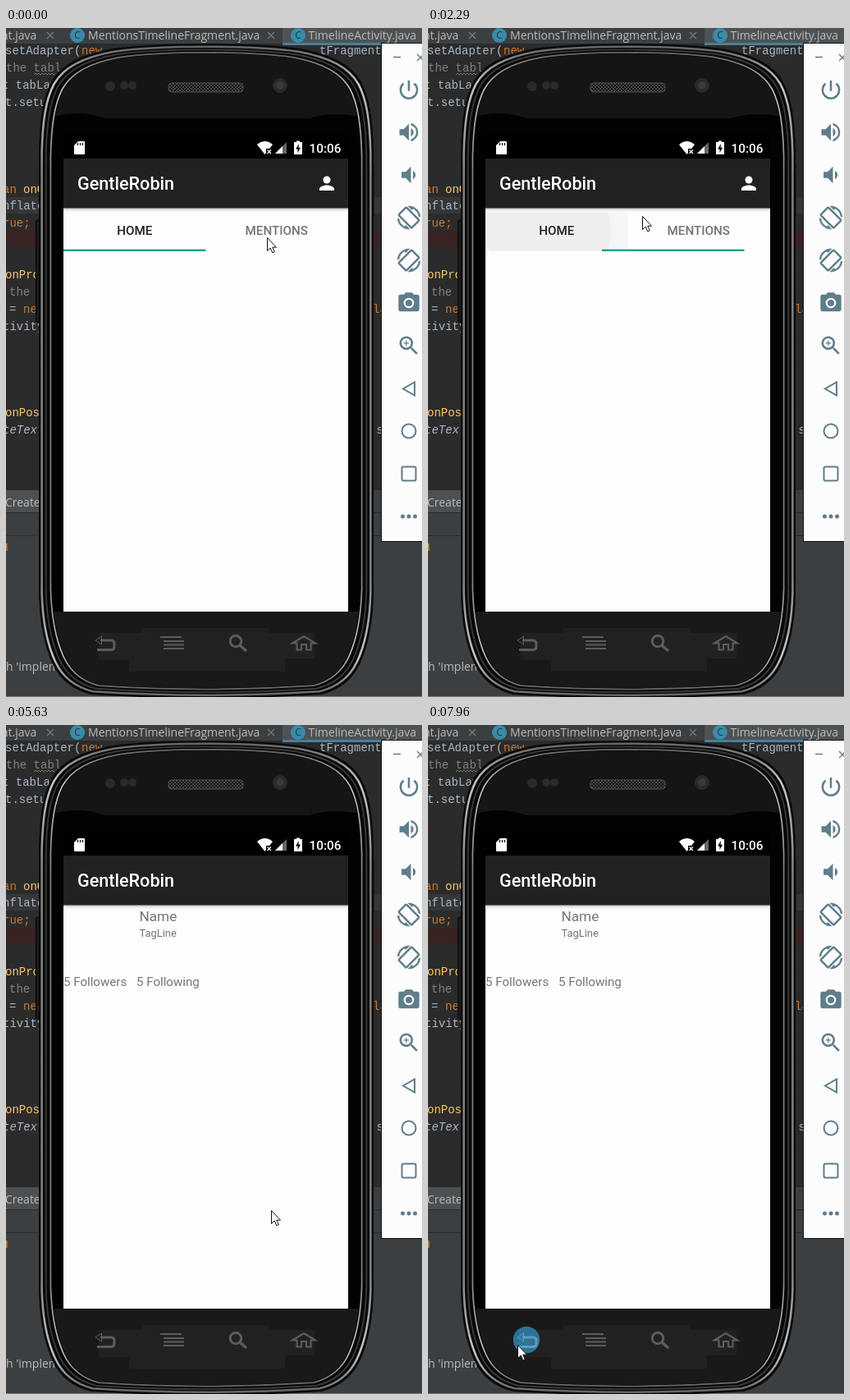
An HTML page that plays this animation: 507x815 px, repeating every 8000 ms.

```html
<!DOCTYPE html>
<html lang="en">
<head>
<meta charset="utf-8">
<title>App demo</title>
<style>
html, body { margin: 0; width: 100%; height: 100%; overflow: hidden; background: #2b2b2b; }
svg { display: block; width: 507px; height: 815px; }
text { white-space: pre; }
.ui { font: 14px "Open Sans", sans-serif; fill: #bbb; }
.code { font: 14px "Liberation Mono", monospace; fill: #a9b7c6; }
.kw { fill: #cc7832; }
.fn { fill: #ffc66d; }
.note { fill: #808080; }
.app { font-family: Roboto, sans-serif; fill: #757575; }
.bold { font-weight: 500; }
.line { fill: none; stroke: #607d8b; stroke-width: 2; }
.key { fill: none; stroke: #5c5c5c; stroke-width: 3; }
</style>
</head>
<body>
<svg viewBox="0 0 507 815">
<defs>
  <path id="shell" d="M41 150C42 110 46 85 56 66C68 45 92 33 130 26C190 18 298 18 358 26C396 33 420 45 432 66C442 85 446 110 447 150V690C446 725 441 752 430 775C420 796 404 806 384 811Q244 820 104 811C84 806 68 796 58 775C47 752 42 725 41 690Z"/>
  <clipPath id="face"><use href="#shell" transform="translate(244 418) scale(.925 .972) translate(-244 -418)"/></clipPath>
  <clipPath id="screen"><rect x="70" y="159" width="347" height="552"/></clipPath>
  <clipPath id="tab"><rect id="tabBox" y="219.500" width="173.500" height="52"/></clipPath>
  <linearGradient id="shade" x2="0" y2="1">
    <stop stop-color="#aaa"/><stop offset=".35" stop-color="#e6e6e6"/><stop offset="1" stop-color="#fcfcfc"/>
  </linearGradient>
  <linearGradient id="rim" x2="0" y2="1">
    <stop stop-color="#666"/><stop offset=".06" stop-color="#c4c4c4"/><stop offset=".2" stop-color="#808080"/>
    <stop offset=".82" stop-color="#808080"/><stop offset=".94" stop-color="#c4c4c4"/><stop offset="1" stop-color="#666"/>
  </linearGradient>
  <pattern id="mesh" width="4" height="4" patternUnits="userSpaceOnUse">
    <rect width="4" height="4" fill="#111"/><path d="M0 0L4 4M4 0L0 4" stroke="#555" stroke-width=".8"/>
  </pattern>
  <g id="badge">
    <circle r="9" fill="#3a8ba8"/>
    <text y="4.200" text-anchor="middle" font-family="Open Sans, sans-serif" font-size="12" fill="#213a44">C</text>
  </g>
  <path id="cross" d="M-4 -4L4 4M4 -4L-4 4" stroke="#777" stroke-width="1.400"/>
  <g id="turn" stroke="#607d8b" stroke-width=".6">
    <rect x="-5.700" y="-9.700" width="11.400" height="19.400" rx="1" transform="rotate(-45)" fill="none" stroke-width="2.100"/>
    <path id="arc" d="M4.480 -9.480C7.750 -7.930 10.090 -4.760 10.450 -1H11.950C11.440 -7.160 6.290 -12 0 -12L-.66 -11.970L3.150 -8.160Z"/>
    <use href="#arc" transform="rotate(180)"/>
  </g>
</defs>

<!-- editor -->
<rect width="507" height="815" fill="#2b2b2b"/>
<rect width="507" height="19" fill="#3c3f41"/>
<rect x="337" width="170" height="19" fill="#4e5254"/>
<rect x="337" y="18" width="170" height="3" fill="#4a7f98"/>
<rect y="206" width="507" height="20" fill="#353637"/>
<rect y="247" width="507" height="20" fill="#3a2323"/>
<rect y="562" width="507" height="253" fill="#3c3f41"/>
<rect y="563" width="42" height="27" fill="#4c5052"/>
<path d="M0 562.500H507M0 590.500H507M0 618.500H507" stroke="#282a2b"/>
<path d="M0 814.500H507" stroke="#777"/>
<g class="ui">
  <text x="-6" y="14">nt.java</text>
  <text x="100" y="14">MentionsTimelineFragment.java</text>
  <text x="368.500" y="14">TimelineActivity.java</text>
  <text x="-1" y="583">Create</text>
  <text x="-5" y="783">th 'impleme</text>
</g>
<use href="#cross" x="54" y="9"/><use href="#cross" x="323" y="9"/>
<use href="#badge" x="87" y="9"/><use href="#badge" x="356" y="9"/>
<g class="code" id="code"></g>
<path d="M34 57l2 -2l2 2l2 -2l2 2l2 -2l2 2l2 -2l2 2l2 -2l2 2l2 -2l2 2l2 -2" fill="none" stroke="#5b8a5b"/>
<rect y="628" width="1.500" height="9" fill="#b8863c"/>

<!-- emulator controls -->
<rect x="457.500" y="18.500" width="60" height="607" fill="#fcfcfd" stroke="#111"/>
<g fill="#607d8b" id="tools">
  <path d="M472 35.500H481M501 32L509 40M509 32L501 40" class="line" style="stroke-width:1.400"/>
  <use href="#turn" transform="translate(491 231) scale(1.160)"/>
  <use href="#turn" transform="translate(491 283) scale(-1.160 1.160)"/>
  <path d="M498 431.500V447.500L484 439.500Z" class="line"/>
  <circle cx="491" cy="491" r="8.500" class="line"/>
  <rect x="482.500" y="534.500" width="17" height="17" rx="2" class="line"/>
  <circle cx="483.500" cy="595" r="2.500"/><circle cx="491" cy="595" r="2.500"/><circle cx="498.500" cy="595" r="2.500"/>
</g>

<!-- handset -->
<rect x="36.500" y="234" width="8" height="124" rx="2" fill="#1a1a1a" stroke="#050505"/>
<rect x="441" y="165" width="7" height="65" rx="2" fill="#222" stroke="#0a0a0a"/>
<use href="#shell" fill="#080808" stroke="#0a0a0a" stroke-width="2"/>
<use href="#shell" fill="none" stroke="url(#rim)" stroke-width="2.600" transform="translate(244 418) scale(.987 .993) translate(-244 -418)"/>
<use href="#shell" fill="none" stroke="#383838" stroke-width="2" transform="translate(244 418) scale(.962 .984) translate(-244 -418)"/>
<use href="#shell" fill="#020202" stroke="url(#rim)" stroke-width="1.800" transform="translate(244 418) scale(.934 .975) translate(-244 -418)"/>
<g clip-path="url(#face)">
  <path d="M50 110V20H440V110Q400 100 370 110H120Q90 98 50 110Z" fill="#151515"/>
  <path d="M40 711H447V815H40Z" fill="#191919"/>
  <path d="M113 737H165V731H320V737H376V768H340V784H150V770H113Z" fill="#212121"/>
</g>
<rect x="198" y="67" width="91" height="11" rx="4" fill="url(#mesh)" stroke="#555"/>
<g fill="#2a2a2a">
  <circle cx="127" cy="71" r="6"/><circle cx="144" cy="70" r="5"/><circle cx="154" cy="70" r="5"/>
  <circle cx="334" cy="70" r="9"/><circle cx="334" cy="70" r="5" fill="#343a42"/>
</g>
<rect x="70" y="130" width="347" height="581" fill="#000"/>
<g fill="#fff">
  <path d="M88 138H95Q96 138 96 139V153Q96 154 95 154H84Q83 154 83 153V143Z"/>
  <path d="M87.500 140V143M90.500 140V143M93.500 140V143" stroke="#000" stroke-width="1.200"/>
  <path d="M306 142Q315.500 134 325 142L321 147H317V152L315.500 154Z"/>
  <path d="M318.500 148.500L323 153M323 148.500L318.500 153" stroke="#fff" stroke-width="1.300"/>
  <path d="M328 153L342 139V153Z" fill="#666"/>
  <path d="M328 153L337 144V153Z"/>
  <path d="M351 139H354V137.500H358V139H361V154H351Z"/>
  <path d="M357 141L353 147.500H355.500V152L359 145.800H356.500Z" fill="#000"/>
  <text x="369.500" y="152" class="app bold" style="fill:#fff" font-size="15.300">10:06</text>
</g>

<g clip-path="url(#screen)">
  <g id="app">
    <rect x="70" y="159" width="347" height="552" fill="#fdfdfd"/>
    <g id="tabs" class="app bold" font-size="15.200">
      <g clip-path="url(#tab)">
        <rect id="wash" x="70" y="219" width="347" height="53"/>
        <circle id="ripple" cy="246"/>
      </g>
      <text id="home" x="156.800" y="251.500" text-anchor="middle">HOME</text>
      <text id="mentions" x="329.800" y="251.500" text-anchor="middle">MENTIONS</text>
      <rect id="bar" y="269.700" width="173.500" height="2.100" fill="#009688"/>
    </g>
    <g id="profile" class="app">
      <text x="162.500" y="238.500" font-size="17.200">Name</text>
      <text x="162.500" y="258" font-size="12.900">TagLine</text>
      <text x="70" y="318" font-size="15.100">5 Followers</text>
      <text x="159" y="318" font-size="15.100">5 Following</text>
    </g>
    <rect x="70" y="219.500" width="347" height="5" fill="url(#shade)"/>
    <rect x="70" y="159" width="347" height="60.500" fill="#212121"/>
    <text x="87" y="197" class="app bold" style="fill:#fff" font-size="21.600">GentleRobin</text>
    <g id="person">
      <circle id="press" cx="392" cy="191.500" r="11" fill="#333"/>
      <circle cx="391" cy="185" r="4.500" fill="#fff"/>
      <path d="M382 198V196C382 193 388 191.500 391 191.500S400 193 400 196V198Z" fill="#fff"/>
    </g>
  </g>
</g>

<!-- hardware keys -->
<circle id="hover" cx="120" cy="749" r="16.200"/>
<g id="backKey" class="key">
  <path d="M115 746H128Q132 746 132 750V753Q132 757.500 128 757.500H111"/>
  <path d="M116.500 741V751L109 746Z" stroke-width="1"/>
</g>
<g class="key">
  <path d="M188 742H214M192 747H217M192 751.500H217M192 756H217" stroke-width="2.200"/>
  <circle cx="280" cy="747" r="6.800"/><path d="M285 752L293 759" stroke-width="3.500"/>
  <path d="M349 749.500L363 741L377 749.500H371.500V757.500H366V751H360V757.500H354.500V749.500Z" stroke-width="2.200"/>
</g>

<path id="cursor" d="M.5 .5V16.500L4.200 13L6.800 18.800L9.300 17.700L6.700 12.200H11.500Z" fill="#fff" stroke="#111"/>
</svg>
<script>
const NS = "http://www.w3.org/2000/svg";
const LOOP = 8000;
const $ = id => document.getElementById(id);

function add(parent, tag, attrs, text = "") {
  const el = document.createElementNS(NS, tag);
  for (const k in attrs) el.setAttribute(k, attrs[k]);
  el.textContent = text;
  parent.append(el);
}
function set(id, attrs) {
  for (const k in attrs) $(id).setAttribute(k, attrs[k]);
}
const show = (id, on) => set(id, { visibility: on ? "visible" : "hidden" });

const code = [
  [-1, 32, "setAdapter("], [92, 32, "new", "kw"], [382, 32, "tFragmentM"],
  [0, 53, "the tabl", "note"], [-5, 74, "t tabLay"], [-1, 95, "t.setup"],
  [-4, 201, "an", "kw"], [21, 201, "onCr", "fn"], [-4, 221, "nflater"],
  [-4, 242, "rue;", "kw"], [-1, 305, "onProf", "fn"], [4, 326, "the ", "note"],
  [4, 347, "="], [21, 347, "new", "kw"], [447, 347, "la", "kw"],
  [-4, 368, "tivity"], [-1, 473, "onPost", "fn"], [-4, 494, "teText"], [443, 494, ".s"]
];
for (const [x, y, text, cls = ""] of code) {
  const attrs = { x, y, class: cls };
  if (text === "teText") attrs["font-style"] = "italic";
  add($("code"), "text", attrs, text);
}

const speaker = "M3 9v6h4l5 5V4L7 9H3zm13.500 3c0-1.770-1.020-3.290-2.500-4.030v8.050c1.480-.73 2.500-2.250 2.500-4.020z";
const icons = [
  [491, 75.5, "M13 3h-2v10h2V3zm4.830 2.170l-1.420 1.420A7 7 0 1 1 7.580 6.580L6.170 5.170A9 9 0 1 0 17.830 5.170z"],
  [491, 127, speaker + "M14 3.230v2.060a7 7 0 0 1 0 13.420v2.060A9 9 0 0 0 14 3.230z"],
  [493.5, 179, speaker],
  [491, 335, "M12 8.800a3.200 3.200 0 1 0 0 6.400a3.200 3.200 0 1 0 0-6.400zM9 2L7.170 4H4a2 2 0 0 0-2 2v12a2 2 0 0 0 2 2h16a2 2 0 0 0 2-2V6a2 2 0 0 0-2-2h-3.170L15 2H9zm3 5a5 5 0 1 1 0 10a5 5 0 1 1 0-10z"],
  [491, 387, "M15.500 14h-.79l-.28-.27A6.500 6.500 0 1 0 13.730 14.430l.27.28v.79l5 5L20.500 19l-5-5zM9.500 14a4.500 4.500 0 1 1 0-9a4.500 4.500 0 1 1 0 9zM10 7H9v2H7v1h2v2h1v-2h2V9h-2z"]
];
for (const [x, y, d] of icons) {
  add($("tools"), "path", {
    d, "fill-rule": "evenodd",
    transform: `translate(${x} ${y}) scale(1.27) translate(-12 -12)`
  });
}

// Each key: start time, then the values held until the next one.
const pointer = [
  [0, 318, 255], [820, 365, 279], [940, 366, 275], [1080, 285, 240], [1200, 199, 219],
  [1350, 140, 226], [1470, 101, 232], [1620, 145, 254], [2290, 261, 229], [2560, 359, 210],
  [2710, 395, 184], [4940, 406, 220], [5090, 404, 290], [5210, 393, 369], [5480, 329, 416],
  [5630, 323, 591], [5780, 365, 660], [5900, 398, 702], [6310, 391, 699], [6460, 273, 389],
  [6610, 228, 520], [6730, 182, 645], [6850, 148, 730], [7000, 126, 745], [7120, 109, 755]
];
const barX = [[0, 70], [550, 140], [670, 243.5], [2290, 212], [2410, 105], [2560, 70]];
// start, tab left, centre, radius, strength
const ripples = [
  [0, 70, 0, 0, 0], [280, 243.5, 318, 35, 1], [400, 243.5, 324, 85, 1], [550, 243.5, 330, 110, .5],
  [670, 70, 0, 0, 0], [2170, 70, 145, 32, 1], [2290, 70, 146.5, 76, 1], [2410, 70, 152, 105, .9],
  [2560, 70, 157, 120, .5], [2710, 70, 157, 120, .2], [2830, 70, 0, 0, 0]
];
const at = (keys, t) => keys.findLast(k => k[0] <= t).slice(1);
const within = (t, a, b) => t >= a && t < b;

function draw(t) {
  const [x, y] = at(pointer, t);
  set("cursor", { transform: `translate(${x} ${y})` });

  const [left, cx, r, strength] = at(ripples, t);
  set("tabBox", { x: left });
  set("wash", { opacity: .06 * strength });
  set("ripple", { cx, r, opacity: .06 * strength });
  set("bar", { x: at(barX, t)[0] });
  const mentions = within(t, 280, 2170);
  $("home").style.fill = mentions ? "#757575" : "#212121";
  $("mentions").style.fill = mentions ? "#212121" : "#757575";

  const profile = t >= 4660;
  show("tabs", !profile);
  show("profile", profile);
  set("person", { display: profile ? "none" : "inline" });
  show("press", t >= 3520 && !profile);
  set("app", { transform: `translate(0 ${within(t, 4660, 4790) ? 3.6 : 0})` });

  const hover = t >= 7000;
  const pressed = within(t, 7680, 7960);
  show("hover", hover);
  set("hover", { fill: pressed ? "#3a8fbc" : "#2d7399" });
  for (const path of $("backKey").children) path.style.stroke = hover ? "#5e9cbd" : "#5c5c5c";
}

const start = performance.now();
function tick() {
  draw((performance.now() - start) % LOOP);
  requestAnimationFrame(tick);
}
draw(0);
requestAnimationFrame(tick);
</script>
</body>
</html>
```
